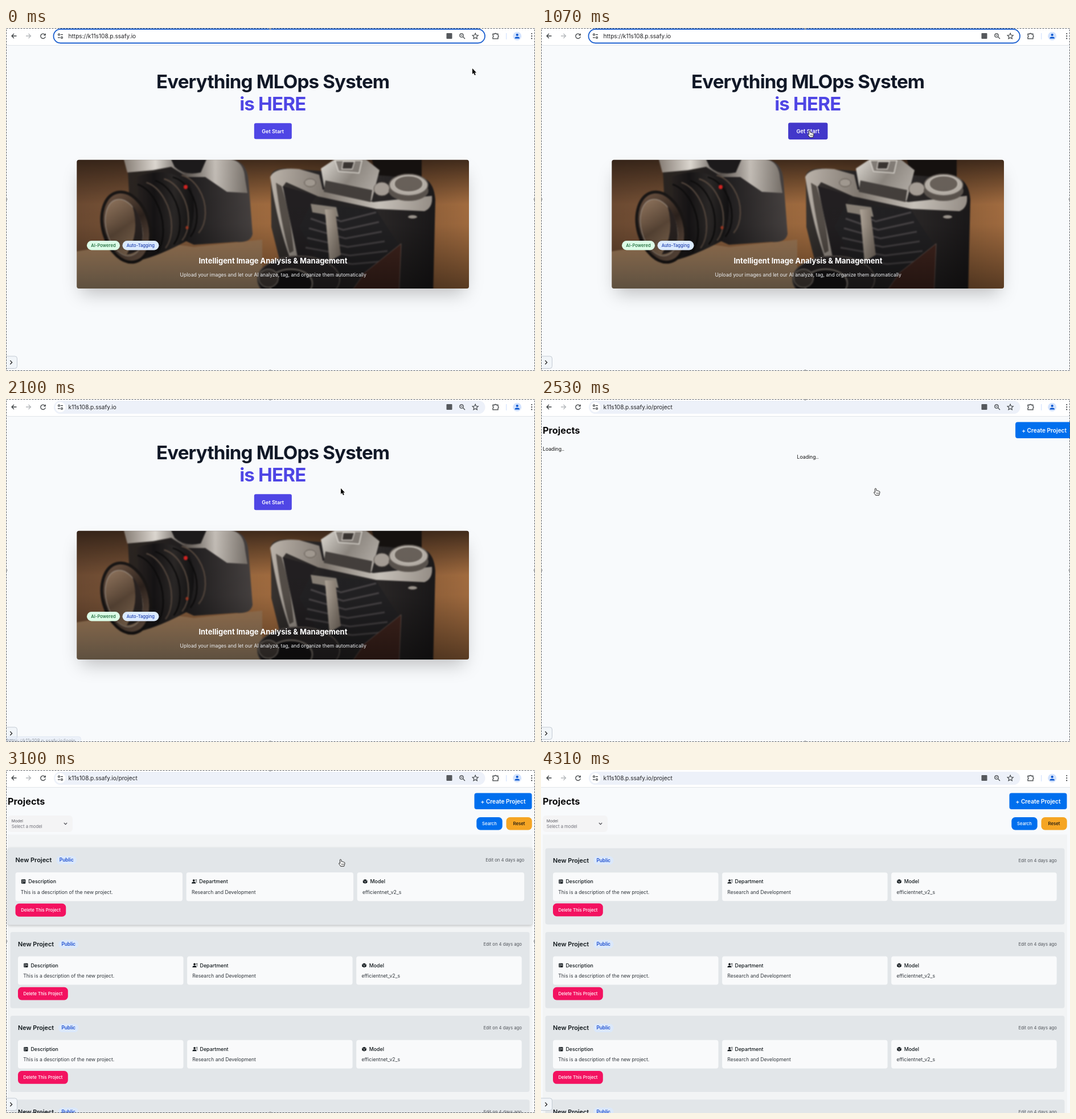
An HTML page with a canvas for the animation above (4.36 s loop, 929x603 px).

```html
<!DOCTYPE html>
<html lang="en">
<head>
<meta charset="utf-8">
<title>Project walkthrough</title>
<style>
html, body { margin: 0; width: 100%; height: 100%; overflow: hidden; background: #f8fafc; }
canvas { display: block; width: 929px; height: 603px; }
</style>
</head>
<body>
<canvas id="stage"></canvas>
<script>
const W = 929, H = 603, LOOP = 4360;
const dpr = window.devicePixelRatio || 1;
const canvas = sized(document.getElementById('stage'));
let ctx = canvas.getContext('2d');

const INK = '#11181c', INDIGO = '#4f46e5', BLUE = '#006fee', PAGE = '#f8fafc';
const TIMES = { click: 1430, project: 2130, hand: 2530, list: 2570, filter: 2700, end: 4310 };

const ramp = (t, a, b) => Math.max(0, Math.min(1, (t - a) / (b - a)));
const ease = p => p * p * (3 - 2 * p);
const mix = (a, b, p) => a + (b - a) * p;

function sized(c) {
  c.width = W * dpr;
  c.height = H * dpr;
  return c;
}
// y is the middle of the capital letters
function text(s, x, y, size, weight = 400, color = INK, align = 'left', spacing = 0) {
  ctx.font = `${weight} ${size}px Inter, "Open Sans", sans-serif`;
  ctx.letterSpacing = spacing + 'px';
  ctx.textAlign = align;
  ctx.fillStyle = color;
  ctx.fillText(s, x, y + size * 0.36);
}
function box(x, y, w, h, r, fill, stroke, lw = 1) {
  ctx.beginPath();
  ctx.roundRect(x, y, w, h, r);
  if (fill) { ctx.fillStyle = fill; ctx.fill(); }
  if (stroke) { ctx.strokeStyle = stroke; ctx.lineWidth = lw; ctx.stroke(); }
}
function oval(x, y, rx, ry, fill, stroke, lw = 1, turn = 0) {
  ctx.beginPath();
  ctx.ellipse(x, y, rx, ry, turn, 0, 7);
  if (fill) { ctx.fillStyle = fill; ctx.fill(); }
  if (stroke) { ctx.strokeStyle = stroke; ctx.lineWidth = lw; ctx.stroke(); }
}
function path(d, fill, stroke, lw = 1.3) {
  const p = new Path2D(d);
  if (fill) { ctx.fillStyle = fill; ctx.fill(p); }
  if (stroke) { ctx.strokeStyle = stroke; ctx.lineWidth = lw; ctx.stroke(p); }
}
function gradient(x0, y0, x1, y1, ...colors) {
  const g = ctx.createLinearGradient(x0, y0, x1, y1);
  colors.forEach((c, i) => g.addColorStop(i / (colors.length - 1), c));
  return g;
}
function shadow(color, blur, y) {
  ctx.shadowColor = color;
  ctx.shadowBlur = blur * dpr;
  ctx.shadowOffsetY = y * dpr;
}
function scaled(cx, cy, k, draw) {
  ctx.save();
  ctx.translate(cx, cy);
  ctx.scale(k, k);
  ctx.translate(-cx, -cy);
  draw();
  ctx.restore();
}

function toolbar(t) {
  const dark = '#3c4043';
  ctx.fillStyle = '#fff';
  ctx.fillRect(0, 0, W, 30);
  ctx.fillStyle = '#e1e5ea';
  ctx.fillRect(0, 30, W, 1);
  path('M18.5 14H10M14 10L10 14L14 18', null, dark);
  path('M35 14H43.5M39.5 10L43.5 14L39.5 18', null, '#b4b7bb');
  path('M68.3 11.6A4.2 4.2 0 1 0 69.2 15M69.2 9.8V12.6H66.2', null, dark);

  const focused = t < TIMES.click;
  if (focused) box(83.5, 2, 757.5, 24.5, 12.2, '#fff', '#1b5fcf', 1.8);
  else {
    box(84, 3, 757.5, 23, 11.5, '#edf1f9');
    oval(95.5, 14.3, 9, 9, '#fff');
  }
  oval(93, 11.7, 1.5, 1.5, null, dark, 1.2);
  oval(98, 16.9, 1.5, 1.5, null, dark, 1.2);
  path('M96 11.7H100M91 16.9H95', null, dark);
  const host = 'k11s108.p.ssafy.io';
  const address = focused ? 'https://' + host : host + (t >= TIMES.project ? '/project' : '');
  text(address, 109.6, 14.3, 10.1, 400, '#202124');

  box(773.5, 9, 10, 10, 1, '#55585c');
  oval(800, 13, 3.2, 3.2, null, dark, 1.2);
  path('M802.4 15.4L806 19M798.4 13H801.6', null, dark, 1.2);
  path('M824.2 9.2L825.7 12.6L829.3 12.9L826.6 15.3L827.4 18.9L824.2 17L821 18.9L821.8 15.3L819.1 12.9L822.7 12.6Z', null, dark, 1.1);
  path('M855 10.5H858A1.6 1.6 0 0 1 861 10.5H864V13A1.6 1.6 0 0 1 864 16V18.8H855V16A1.6 1.6 0 0 0 855 13Z', null, dark, 1.3);
  ctx.fillStyle = '#d3e3fd';
  ctx.fillRect(878, 9, 1.2, 11);
  oval(897.7, 14.2, 7.5, 7.5, '#d3e3fd');
  oval(897.7, 12, 2.1, 2.1, '#0b57d0');
  path('M893.6 18.6V17.4C893.6 14.8 901.8 14.8 901.8 17.4V18.6Z', '#0b57d0');
  [10, 14.2, 18.4].forEach(y => oval(923.2, y, 1.1, 1.1, dark));
}

function table() {
  ctx.fillStyle = gradient(124, 0, 813, 0, '#6f4c33', '#8a603f', '#a66f41', '#7a5233', '#a87042');
  ctx.fillRect(110, 220, 720, 250);
  ctx.fillStyle = gradient(0, 231, 0, 310, 'rgba(38,25,17,.8)', 'rgba(38,25,17,0)');
  ctx.fillRect(110, 220, 720, 90);
  path('M110 395Q250 370 330 385L450 372V470H110Z', gradient(0, 370, 0, 459, '#a27a56', '#b39878'));
  path('M640 220H730V262L650 262Z', '#15110f');
}

function leftCamera() {
  path('M213 231H398Q424 236 426 270L433 362Q430 378 405 376L330 381L218 330Z', gradient(215, 0, 430, 0, '#2b2521', '#1f1d1e', '#474241'));
  path('M207 231H395Q418 234 420 266L424 290L388 288L350 262L318 262L290 244L258 250L213 254Z', gradient(210, 0, 420, 0, '#8a8179', '#dcd7d0', '#57504b', '#c4beb7', '#7d766f'));
  path('M290 231H352L342 254Q312 260 296 244Z', '#1c1a1b');
  path('M230 262Q280 240 322 274Q340 320 318 374Q270 400 236 408Z', gradient(225, 0, 330, 0, '#2a2422', '#161415', '#2b2827', '#121112'));
  for (let i = 0; i < 6; i++) {
    ctx.beginPath();
    ctx.ellipse(232 + i * 15, 340 - i * 5, 42, 68 - i * 2, -0.25, -1.2, 1.1);
    ctx.strokeStyle = i % 2 ? '#57493f' : '#0c0b0b';
    ctx.lineWidth = 2.4;
    ctx.stroke();
  }
  oval(211, 350, 41, 63, gradient(175, 300, 240, 400, '#6a5140', '#2c221d', '#6d5646'), '#191615', 5, -0.27);
  oval(207, 351, 31, 51, gradient(180, 310, 235, 390, '#8c715a', '#5b4737', '#94785d'), '#a3968a', 1.3, -0.27);
  path('M222 312Q246 340 238 386Q224 398 212 398Q236 360 222 312Z', '#2a2321');
  oval(315.5, 279.5, 3.5, 3.8, '#d32422');
  oval(318, 351, 2.6, 3, '#a33b24');
}

function rightCamera() {
  path('M465 258Q470 246 495 247L736 265Q752 274 754 302L750 470H496L466 350Z', gradient(465, 0, 752, 0, '#3a3532', '#232122', '#2b2828', '#1b191a'));
  path('M464 262Q472 244 515 248L550 258L556 284L645 306L748 295Q750 316 735 322L650 318L548 296L492 271L486 279Q506 330 512 400L500 408Q478 350 464 262Z', gradient(464, 0, 750, 0, '#bdb5ac', '#827a72', '#cfc9c1', '#9a928a'));
  path('M474 272L484 278Q500 330 505 392L498 396Q482 340 474 272Z', '#57504a');
  path('M486 278L545 295L532 315L545 400L512 402Z', '#232022');
  path('M553 247L577 231H632L656 250L642 304L560 287Z', gradient(555, 231, 650, 300, '#ddd9d2', '#8e8881', '#bbb5ae'));
  path('M578 233H625L620 255L584 252Z', '#827c76', '#e3dfd8', 1.5);
  path('M592 235H612L608 248H590Z', '#393431', '#d7d2cb', 1.5);
  path('M561 268L643 285L640 306L558 288Z', '#45403d');
  oval(534, 272, 10, 7, '#a39b92', '#5b534c');
  oval(660, 283, 14, 12, '#a8a098', '#554e48');
  oval(707, 286, 35, 18, '#5b544e');
  oval(707, 276, 34, 19, '#b7b0a8', '#615a54', 2);
  oval(707, 274, 25, 14, '#6a625b', '#ddd8cf', 1);
  path('M536 308L650 320L692 385L660 440L560 430L515 350Z', '#232224');
  for (let i = 0; i < 6; i++) {
    path(`M${538 - i * 3} ${318 + i * 17}L${588 + i * 4} ${340 + i * 15}L${650 + i * 5} ${324 + i * 17}`, null, '#4a4648', 3);
  }
  path('M535 309L580 315L584 332L538 324Z', '#8c847a');
  path('M560 319H578L588 399L568 410Z', gradient(560, 0, 590, 0, '#b5aa9d', '#776c61'));
  path('M630 430L694 379L690 470H602Z', '#43261f', '#72605a', 1);
  oval(514, 442, 72, 41, '#2b2728', '#5f5752', 2);
  oval(500, 449, 38, 25, '#171516', '#817971', 3);
  oval(461, 440, 17, 16, '#4a423d', '#857c73', 2);
  oval(714, 332, 8, 3, '#a19a92');
}

function layer(draw) {
  const c = sized(document.createElement('canvas')), outer = ctx;
  ctx = c.getContext('2d');
  ctx.scale(dpr, dpr);
  draw();
  ctx = outer;
  return c;
}
const sharp = layer(() => { table(); leftCamera(); rightCamera(); });
const cameras = layer(() => {
  ctx.filter = `blur(${1.3 * dpr}px)`;
  ctx.drawImage(sharp, 0, 0, W, H);
});

function photo() {
  ctx.save();
  shadow('rgba(0,0,0,.25)', 32, 16);
  box(132, 240, 673, 210, 4, '#555');
  ctx.restore();
  ctx.save();
  ctx.beginPath();
  ctx.roundRect(124.3, 231.7, 688.7, 226.3, 4);
  ctx.clip();
  ctx.drawImage(cameras, 0, 0, W, H);
  ctx.fillStyle = gradient(0, 231, 0, 459, 'rgba(0,0,0,0)', 'rgba(0,0,0,.06)', 'rgba(0,0,0,.48)');
  ctx.fillRect(124, 231, 689, 228);
  ctx.restore();
  box(142, 374, 58, 16.5, 8.2, '#dcfce7');
  text('AI-Powered', 171, 382.4, 7.7, 500, '#166534', 'center');
  box(204.5, 374, 64, 16.5, 8.2, '#dbeafe');
  text('Auto-Tagging', 236.3, 382.4, 7.6, 500, '#1e40af', 'center');
  text('Intelligent Image Analysis & Management', 468.9, 408.9, 12.95, 700, '#fff', 'center');
  text('Upload your images and let our AI analyze, tag, and organize them automatically', 469.2, 433.7, 8.65, 400, '#eceef1', 'center');
}

function home(t) {
  text('Everything MLOps System', 468.6, 94.5, 33.15, 700, '#111827', 'center', -0.83);
  text('is HERE', 468.4, 133.1, 33.15, 700, INDIGO, 'center', -0.83);
  const hover = ease(ramp(t, 830, 980)) - ease(ramp(t, 1765, 1915));
  scaled(468.7, 181, 1 + 0.05 * hover, () => {
    const [r, g, b] = [mix(79, 67, hover), mix(70, 56, hover), mix(229, 202, hover)];
    box(435.8, 167.2, 66, 28, 3, `rgb(${r},${g},${b})`);
    text('Get Start', 468.7, 181.3, 9, 600, '#fff', 'center');
  });
  photo();
}

function chevron(x, y, w, h, color) {
  path(`M${x - w} ${y - h}L${x} ${y + h}L${x + w} ${y - h}`, null, color, 1.1);
}
function header(shift) {
  text('Projects', 3, 55.2, 16.3, 700, '#0b0b0c');
  box(822.5 + shift, 40.5, 101, 28.5, 4, BLUE);
  text('+ Create Project', 873 + shift, 55, 10.1, 600, '#fff', 'center');
}
function filters() {
  box(3, 80, 114, 29, 6, '#f4f4f5');
  text('Model', 9.8, 89.2, 6.8, 400, '#52525b');
  text('Select a model', 9.8, 98.8, 7.7, 400, '#71717a');
  chevron(104.5, 94.3, 2.7, 1.4, '#3f3f46');
  box(826.3, 83, 45.4, 22.5, 6.5, BLUE);
  text('Search', 849, 94.4, 7.7, 500, '#fff', 'center');
  box(878.5, 83, 45.2, 22.5, 6.5, '#f5a524');
  text('Reset', 901, 94.4, 7.8, 500, '#111', 'center');
}
function spinner(t) {
  const turn = ramp(t, TIMES.list, TIMES.list + 800) * Math.PI * 2;
  ctx.beginPath();
  ctx.arc(14, 93, 9.7, Math.PI * 0.2 + turn, Math.PI * 0.8 + turn);
  ctx.strokeStyle = BLUE;
  ctx.lineWidth = 1.8;
  ctx.stroke();
}

const icons = [
  (x, y) => {
    box(x + 1, y - 3.7, 7.2, 7.4, 1, INK);
    path(`M${x + 3} ${y - 3}V${y + 3}`, null, '#fff', 0.7);
    path(`M${x + 4.5} ${y - 1.5}H${x + 7}M${x + 4.5} ${y + 0.4}H${x + 7}`, null, '#fff', 0.8);
  },
  (x, y) => {
    oval(x + 3.7, y - 1.9, 1.9, 1.9, INK);
    path(`M${x} ${y + 3.5}Q${x} ${y + 0.6} ${x + 3.7} ${y + 0.6}T${x + 7.2} ${y + 3.5}Z`, INK);
    path(`M${x + 6.5} ${y - 3}H${x + 9}M${x + 7} ${y - 0.8}H${x + 9}M${x + 8} ${y + 1.4}H${x + 9}`, null, INK, 1);
  },
  (x, y) => {
    path(`M${x + 4.5} ${y - 4}L${x + 8.3} ${y - 2}V${y + 2}L${x + 4.5} ${y + 4}L${x + 0.7} ${y + 2}V${y - 2}Z`, INK);
    path(`M${x + 1} ${y - 1.8}L${x + 4.5} ${y}L${x + 8} ${y - 1.8}M${x + 4.5} ${y}V${y + 3.8}`, null, '#fff', 0.6);
  }
];
const fields = [
  ['Description', 'This is a description of the new project.'],
  ['Department', 'Research and Development'],
  ['Model', 'efficientnet_v2_s']
];

function card(y, hover) {
  scaled(463.6, y + 67, 1 + 0.01 * hover, () => {
    ctx.save();
    if (hover) shadow(`rgba(0,0,0,${0.22 * hover})`, 4, 1.5);
    box(7.5, y, 912, 134, 4, '#e2e6e9');
    ctx.restore();
    text('New Project', 21, y + 21.5, 10.8, 600);
    box(92, y + 14, 35.5, 15, 7.5, '#dbe8fa');
    text('Public', 109.8, y + 21.4, 8.3, 600, '#1d4fd0', 'center');
    text('Edit on 4 days ago', 905.8, y + 21.4, 7.7, 400, '#52565c', 'right');
    fields.forEach(([label, value], i) => {
      const x = 21 + 297.1 * i;
      box(x, y + 42.7, 290.5, 50, 4, '#f9fafb');
      icons[i](x + 9.3, y + 58.6);
      text(label, x + 22.5, y + 58.8, 8.8, 500);
      text(value, x + 9.2, y + 77, 8.6, 400, '#30363c');
    });
    box(21, y + 97, 87.8, 22.7, 6.5, '#f31260');
    text('Delete This Project', 65, y + 108.4, 7.65, 500, '#fff', 'center');
  });
}

function projects(t) {
  if (t < TIMES.list) {
    header(10.6);
    text('Loading..', 3, 87.6, 8.7, 400, '#111');
    text('Loading..', 468.6, 101.4, 8.7, 400, '#111', 'center');
    return;
  }
  const ready = t >= TIMES.filter;
  ctx.fillStyle = '#f2f4f5';
  ctx.fillRect(3, 113.5, 921, H);
  header(0);
  if (ready) filters(); else spinner(t);
  const hover = t < TIMES.end ? ease(ramp(t, TIMES.list + 20, TIMES.list + 330)) : 0;
  const top = ready ? 137.5 : 136.3;
  for (let i = 0; i < 4; i++) card(top + 147.3 * i, i ? 0 : hover);
}

function linkHint(t) {
  const alpha = ramp(t, 1130, 1260) * (1 - ramp(t, 2040, 2170));
  if (!alpha) return;
  ctx.save();
  ctx.globalAlpha = alpha;
  box(-5, 593.5, 136.5, 20, 4, '#e3ebf7', '#cfd8e6', 0.8);
  text('https://k11s108.p.ssafy.io/login', 1.5, 600.6, 8.4, 400, '#50565e');
  ctx.restore();
}

function frameLine() {
  ctx.save();
  ctx.setLineDash([3, 2]);
  ctx.strokeStyle = '#55585c';
  ctx.lineWidth = 1;
  ctx.strokeRect(0.5, 0.5, W - 1, H - 1);
  ctx.restore();
  [[464, 0], [464, 603], [0, 301], [929, 301]].forEach(([x, y]) => oval(x, y, 2.5, 2.5, '#a6a8aa'));
}

function cursor(t) {
  const a = ease(ramp(t, 0, 1000)), b = ease(ramp(t, 1630, 2050));
  const x = mix(819, 472, a) + 116 * b;
  const y = mix(71, 180, a) - 23 * b;
  const onButton = t < TIMES.project && x > 435 && x < 503 && y > 166 && y < 196;
  ctx.save();
  ctx.translate(x, y);
  ctx.lineJoin = 'round';
  if (onButton || t >= TIMES.hand) {
    path('M-1.6 1.2C-1.6 -.2 .6 -.2 .7 1.2L1.2 4.2C2 3.3 3.2 3.8 3.3 4.6C4.2 4 5.1 4.5 5.2 5.3C6.2 4.9 7 5.4 7 6.5L6.6 9.3L5.6 12.3H-.3C-.8 10.6 -2.7 9.2 -3.4 7.6C-3.7 6.5 -2.4 6.2 -1.2 7.4Z', '#fff', '#222', 1);
    path('M1.4 7.4L1.6 10.2M3.2 7.4V10.2M4.9 7.4L4.7 10.2', null, '#333', 0.7);
  } else {
    const arrow = 'M0 0V10L2.3 8L4 12L5.8 11.2L4.1 7.4H7.1Z';
    path(arrow, null, '#fff', 1.4);
    path(arrow, '#000');
  }
  ctx.restore();
}

function draw(t) {
  ctx.setTransform(dpr, 0, 0, dpr, 0, 0);
  ctx.fillStyle = PAGE;
  ctx.fillRect(0, 0, W, H);
  if (t < TIMES.project) home(t); else projects(t);
  toolbar(t);
  box(-5, 577, 24.5, 21.5, 4, '#f1f5f9', '#c3cad3', 1);
  path('M7.3 584.5L10.6 587.9L7.3 591.3', null, '#222', 1.3);
  linkHint(t);
  if (t < TIMES.end) {
    frameLine();
    cursor(t);
  }
}

const start = performance.now();
function tick() {
  draw((performance.now() - start) % LOOP);
  requestAnimationFrame(tick);
}
tick();
</script>
</body>
</html>
```
